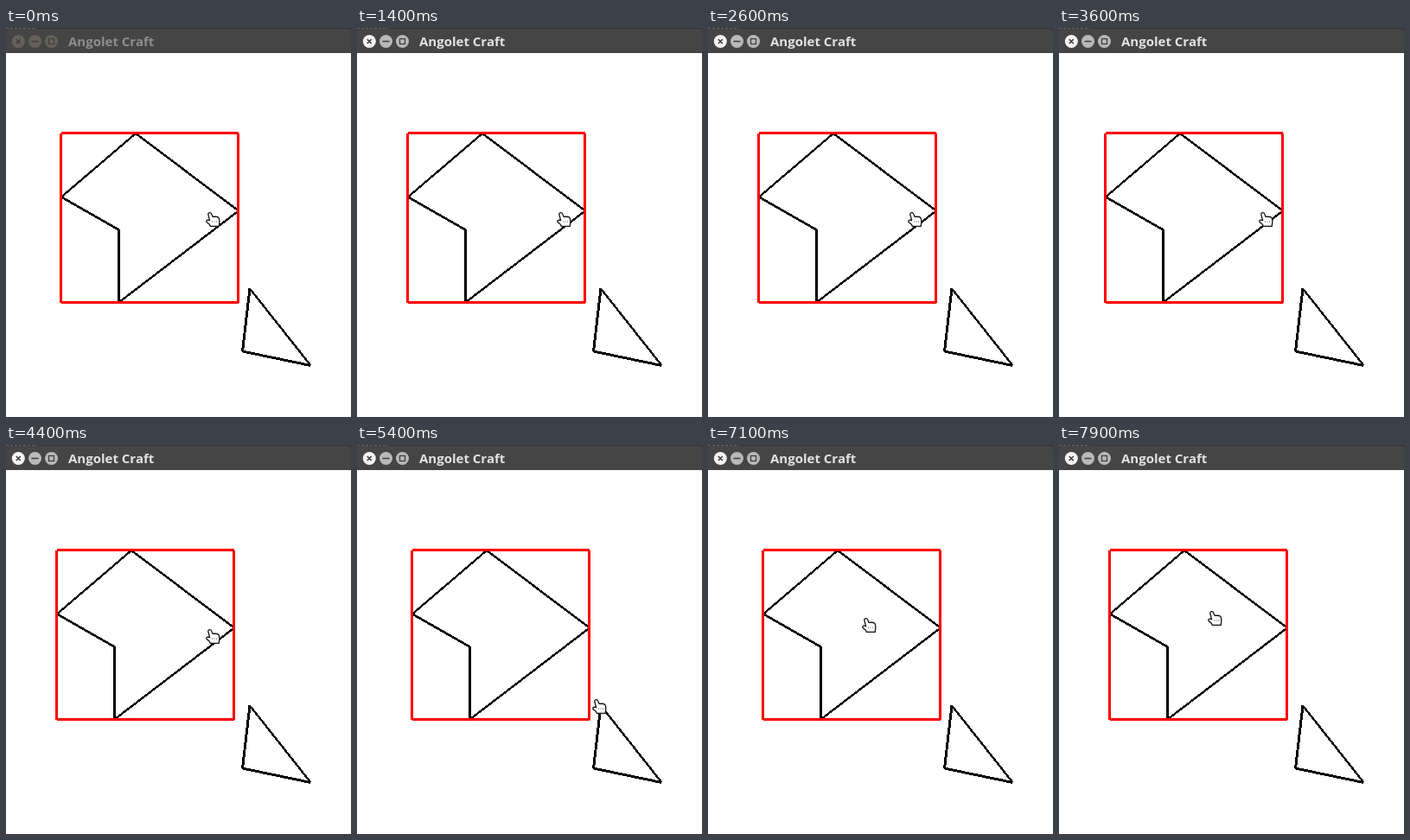
Recreate the animation shown at these times as an HTML page. Size 399 px wide and 450 px high, loop 8 s.

```html
<!DOCTYPE html>
<html lang="en">
<head>
<meta charset="utf-8">
<title>Angolet Craft</title>
<style>
html, body { margin: 0; width: 100%; height: 100%; overflow: hidden; background: #fff; }
svg { display: block; width: 399px; height: 450px; }
text { font: 700 15px "Open Sans", "Noto Sans", sans-serif; }
.edges { shape-rendering: crispEdges; }
</style>
</head>
<body>
<svg viewBox="0 0 399 450">
  <rect width="399" height="450" fill="#fff"/>
  <rect width="399" height="6" fill="#343434"/>
  <path d="M0 .5H36" stroke="#666" stroke-dasharray="3 2"/>
  <path d="M0 29V5Q0 1 4 1H395Q399 1 399 5V29Z" fill="#454545"/>
  <g id="buttons">
    <circle id="close" cx="14.3" cy="15.5" r="7.5"/>
    <circle cx="33.5" cy="15.5" r="7.5"/>
    <circle cx="52.5" cy="15.5" r="7.5"/>
  </g>
  <g fill="none" stroke="#3e3e3c" stroke-width="1.6">
    <path d="M11.8 13l5 5m0-5l-5 5M29.5 15.5h8"/>
    <rect x="49.5" y="12.5" width="6" height="6" stroke-width="1.3"/>
  </g>
  <text id="title" x="72" y="21">Angolet Craft</text>
  <g id="triangle" class="edges" stroke="#000"></g>
  <g id="shape" class="edges">
    <g id="outline" stroke="#000"></g>
    <g id="frame" stroke="#f00"></g>
  </g>
  <g id="hand" stroke="#111" stroke-linejoin="round">
    <path fill="#fff" stroke-width="1.3" d="M4.3 .7Q6.2 .5 6.9 2.4L8.2 5.4Q13.6 4.8 14.9 6.4Q15.8 7.6 15.8 12L15.2 16.3H5.2L4.4 14.2L1 11.6Q.4 9 2.6 9.2L4.6 9.6L2.9 3Q2.4 1.2 4.3 .7Z"/>
    <path fill="none" stroke="#666" d="M7.5 10.5v1.2M10 10.5v1.2M12.5 10.5v1.2"/>
  </g>
</svg>
<script>
const LOOP = 8000, TICK = 100, FOCUS = 1300, NUDGE = 5;
const el = id => document.getElementById(id);
const clamp = (v, low, high) => Math.min(high, Math.max(low, v));

// Edges keep three pixels across their minor axis, with flat ends.
function drawEdges(group, points) {
  points.forEach(([x1, y1], i) => {
    const [x2, y2] = points[(i + 1) % points.length];
    const dx = x2 - x1, dy = y2 - y1;
    const line = document.createElementNS("http://www.w3.org/2000/svg", "line");
    const attrs = { x1, y1, x2, y2 };
    attrs["stroke-width"] = 3 * Math.max(Math.abs(dx), Math.abs(dy)) / Math.hypot(dx, dy);
    for (const key in attrs) line.setAttribute(key, attrs[key]);
    group.appendChild(line);
  });
}

const corners = (x, y, w, h) => [[x, y], [x + w, y], [x + w, y + h], [x, y + h]];

drawEdges(el("outline"), [[64, 195.5], [150, 122], [269, 211.5], [131, 317], [130.5, 233.5]]);
drawEdges(el("frame"), corners(63.5, 121.5, 205, 196));
drawEdges(el("triangle"), [[282, 301.5], [352.5, 390.5], [273.5, 374]]);

// Number of evenly spaced key presses made so far in one burst
const presses = (t, start, gap, count) =>
  clamp(Math.floor((t - start) / gap) + 1, 0, count);

function shiftAt(t) {
  const left = presses(t, 1400, 230, 4) + presses(t, 3400, 200, 3) + presses(t, 7900, TICK, 1);
  const right = presses(t, 2260, 170, 4) + presses(t, 4000, 350, 3);
  return NUDGE * (right - left);
}

function ease(t, start, end) {
  const k = clamp((t - start) / (end - start), 0, 1);
  return k * k * (3 - 2 * k);
}

// The pointer goes down to the triangle, drifts up, then returns to the shape.
function pointerAt(t) {
  const down = ease(t, 5200, 5600), drift = ease(t, 5700, 5900), back = ease(t, 6400, 7200);
  return [
    Math.round(231 + 81 * down - 140 * back),
    Math.round(213 + 161 * down - 5 * drift - 177 * back)
  ];
}

function render(time) {
  const t = Math.floor(time % LOOP / TICK) * TICK;
  const focused = t >= FOCUS;
  const paint = (id, on, off) => el(id).setAttribute("fill", focused ? on : off);
  paint("title", "#e2e2e2", "#8e8e8e");
  paint("buttons", "#b9b9b9", "#63615a");
  paint("close", "#f4f4f4", "#63615a");
  el("shape").setAttribute("transform", `translate(${shiftAt(t)} 0)`);
  el("hand").setAttribute("transform", `translate(${pointerAt(t)})`);
}

const start = performance.now();
function loop() {
  render(performance.now() - start);
  requestAnimationFrame(loop);
}
loop();
</script>
</body>
</html>
```
